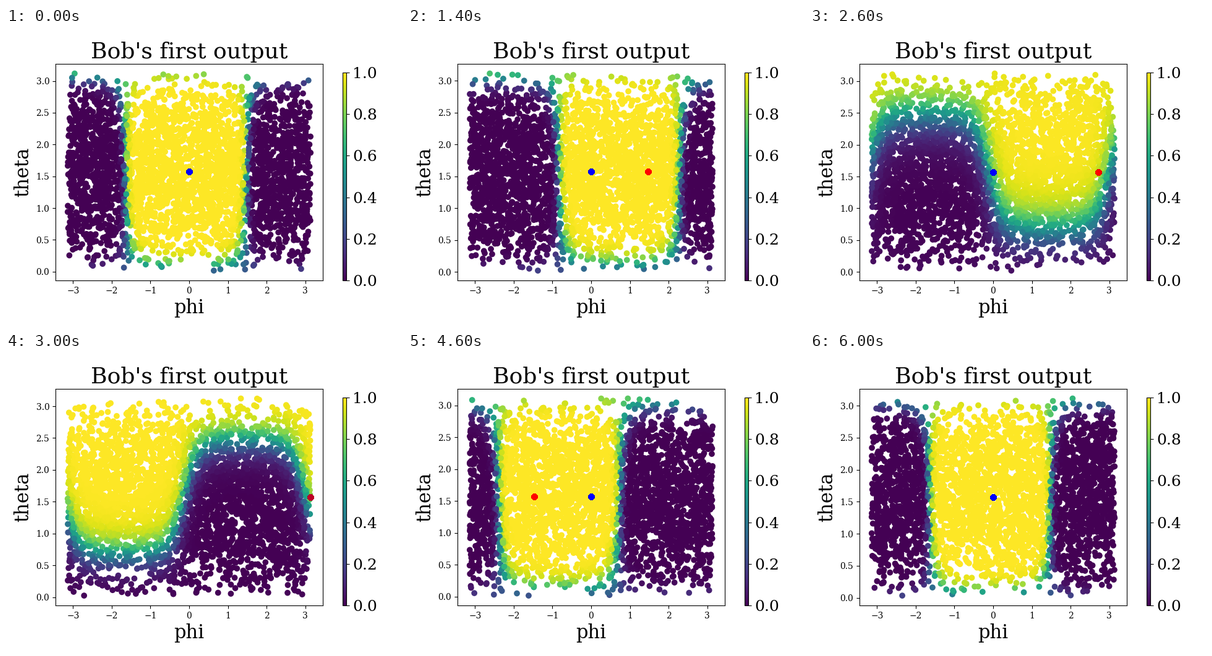
Recreate the animation shown at these times as a matplotlib script. Size 640 by 480 pixels, loop 6200 ms.

```python
import numpy as np
import matplotlib.pyplot as plt
from matplotlib.animation import FuncAnimation

FRAMES, STEP_MS = 31, 200
SAMPLES = 3600
COPIES = 300  # stacked markers give the hard octagonal rim

plt.rcParams.update({"font.family": "DejaVu Serif", "font.size": 10})
fig = plt.figure(figsize=(6.4, 4.8), dpi=100)
ax = fig.add_axes([.125, .15, .675, .73])
ax.set_title("Bob's first output", fontsize=26)
ax.set_xlabel("phi", fontsize=22)
ax.set_ylabel("theta", fontsize=22)
ax.set_xlim(-1.1 * np.pi, 1.1 * np.pi)

cloud = ax.scatter(np.zeros(SAMPLES), np.zeros(SAMPLES), c=np.zeros(SAMPLES),
                   cmap="viridis", vmin=0, vmax=1)


def marker():
    return ax.scatter(np.zeros(COPIES), np.full(COPIES, np.pi / 2))


red, blue = marker(), marker()

bar = fig.colorbar(cloud, cax=fig.add_axes([.85, .15, .01, .7]))
bar.set_ticks(np.linspace(0, 1, 6))
bar.ax.tick_params(labelsize=18)


def sample(rng):
    """Points spread evenly over the sphere, with jittered theta limits."""
    low, high = rng.uniform(.015, .035), np.pi - rng.uniform(.015, .035)
    phi = rng.uniform(-np.pi, np.pi, SAMPLES)
    theta = np.arccos(rng.uniform(np.cos(high), np.cos(low), SAMPLES))
    theta[:2] = low, high
    return phi, theta


def response(phi, theta, angle):
    """Soft hemisphere around the sum of two unit vectors angle apart."""
    overlap = np.cos(angle / 2)
    spread = 1 - abs(overlap)
    flip = np.tanh(10 * overlap - 1.5)  # the hemisphere swaps near opposition
    gain = flip * (15 - 8.5 * spread)
    center = angle / 2 - .08 + spread * (.115 + .185 * flip)
    polar = 1 + 3.5 * spread ** 2
    logit = (gain * np.sin(theta) * np.tanh(2 * np.cos(phi - center))
             - polar * np.cos(theta))
    return 1 / (1 + np.exp(-logit))


def update(i):
    angle = 2 * np.pi * i / (FRAMES - 1)
    phi, theta = sample(np.random.default_rng(i + 11))
    cloud.set_offsets(np.column_stack([phi, theta]))
    cloud.set_array(response(phi, theta, angle))

    x = angle if angle < np.pi + 1e-6 else angle - 2 * np.pi
    red.set_offsets(np.tile([x, np.pi / 2], (COPIES, 1)))
    muted = abs(np.cos(angle / 2)) < .15
    red.set_color("#be0026" if muted else "red")
    blue.set_color("#3b528b" if muted else "blue")

    margin = .05 * np.ptp(theta)
    ax.set_ylim(theta.min() - margin, theta.max() + margin)
    return cloud, red, blue


anim = FuncAnimation(fig, update, frames=FRAMES, interval=STEP_MS,
                     init_func=lambda: update(0), repeat=True, repeat_delay=0)
plt.show()
```
